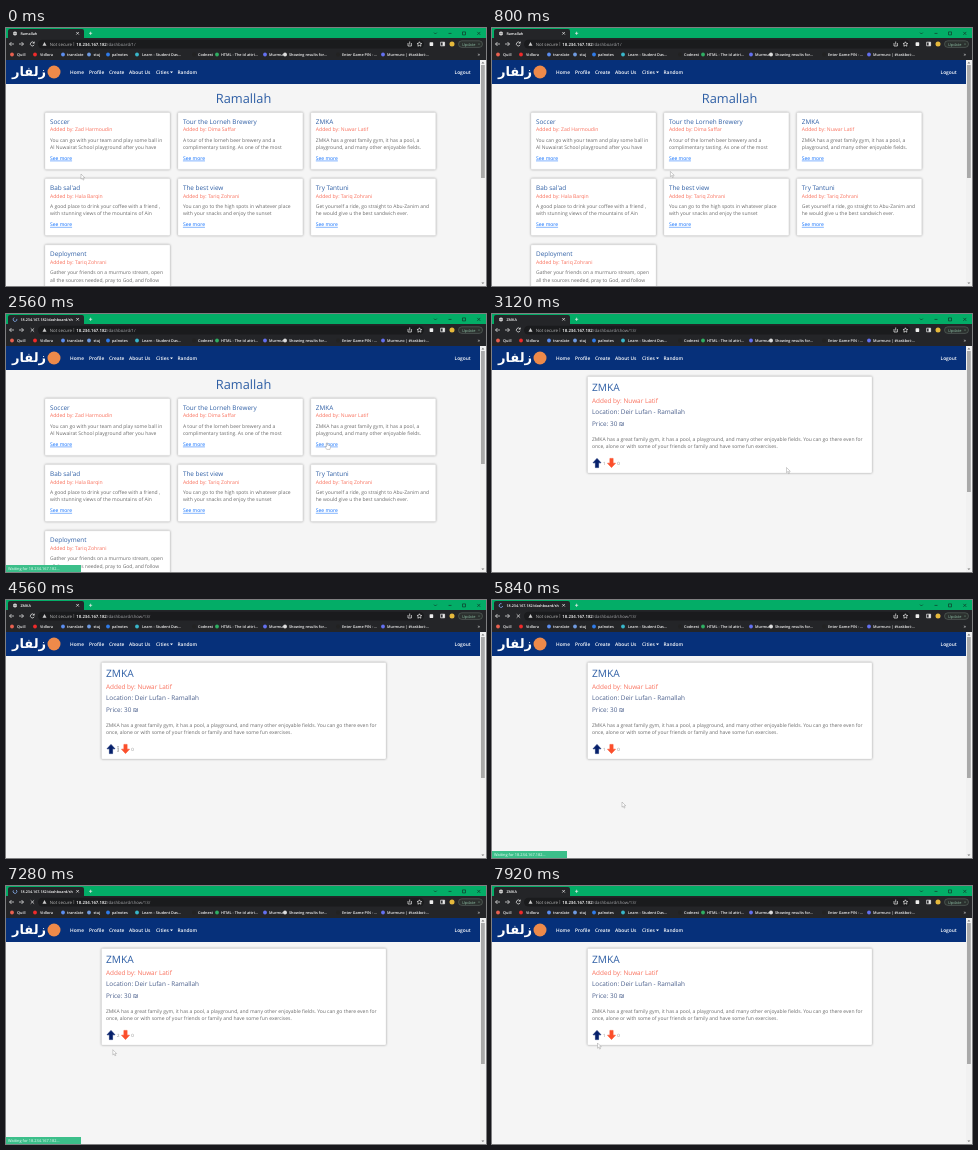
An HTML page for the animation above (8000 ms loop, 480 by 258 pixels).

```html
<!DOCTYPE html>
<html lang="en">
<head>
<meta charset="utf-8">
<style>
html, body { margin: 0; width: 100%; height: 100%; overflow: hidden; background: #f5f5f5; }
svg { display: block; width: 480px; height: 258px; font-family: "Open Sans", sans-serif; text-rendering: geometricPrecision; }
text { white-space: pre; }
.card { fill: #fff; stroke: #d4d4d4; stroke-width: .3; filter: drop-shadow(.9px .9px .9px #0005); }
.line { fill: none; stroke: #eee; stroke-width: .7; }
.pointer { fill: #fff; stroke: #777; stroke-width: .35; }
</style>
</head>
<body>
<svg id="stage" viewBox="0 0 480 258"></svg>
<script>
const HOST = '18.234.167.182';
const BLUE = '#2f5fa5', CORAL = '#f9705c', GREY = '#6a6a6a', SLATE = '#4a5f8c';

const text = (x, y, size, fill, str, attrs = '') =>
  `<text x="${x}" y="${y}" font-size="${size}" fill="${fill}" ${attrs}>${str}</text>`;
const rect = (x, y, w, h, fill, attrs = '') =>
  `<rect x="${x}" y="${y}" width="${w}" height="${h}" fill="${fill}" ${attrs}/>`;
const dot = (x, y, r, fill) => `<circle cx="${x}" cy="${y}" r="${r}" fill="${fill}"/>`;
const line = (d, attrs = '') => `<path class="line" d="${d}" ${attrs}/>`;
const group = (id, body) => `<g id="${id}">${body}</g>`;

const bookmarks = [
  [6, 11, '#e8604f', 'Quill'], [29, 34, '#f02a2a', 'Vidlora'],
  [57, 61, '#5b8def', 'translate'], [83, 87.5, '#6f9ae0', 'stuj'],
  [102, 106, '#2f7be8', 'palnotes'], [131, 136, '#38b6c9', 'Learn - Student Das...'],
  [188, 192, '#222', 'Codnest'], [211, 215, '#2fae62', 'HTML - The id attri...'],
  [259, 263, '#6370f0', 'Murmuro'], [279, 283, '#ddd', 'Showing results for...'],
  [332, 336, '#222', 'Enter Game PIN - ...'], [377, 381, '#6370f0', 'Murmuro | #taskbot-...'],
];

function browser() {
  return rect(0, 0, 480, 11, '#03ad67') +
    rect(2, 1, 76, 12, '#242528', 'rx="2"') +
    rect(0, 10, 480, 22, '#242528') +
    group('globe', dot(9, 5.5, 2, '#eee') + line('M7 5.5h4M9 3.5v4', 'style="stroke:#555;stroke-width:.4"')) +
    group('spinner', '<path d="M9 3.6a1.9 1.9 0 1 1-1.9 1.9" fill="none" stroke="#8ab4f8" stroke-width=".7"/>') +
    text(14.5, 6.8, 3.7, '#fff', '', 'id="title" font-weight="600"') +
    line('M70.3 4l2.6 2.6M72.9 4l-2.6 2.6M83 5.3h3.2M84.6 3.7v3.2') +
    line('M428 4.6l1.4 1.4 1.4-1.4M442.5 5.4h3M456.5 3.9h3v3h-3zM471.3 3.9l3 3M474.3 3.9l-3 3', 'style="stroke:#12382a"') +
    rect(32, 11.8, 386, 8.6, '#1a1b1d', 'rx="4.3"') +
    line('M8 16H3.5M5.5 14l-2 2 2 2M13 16h4.5M15.5 14l2 2-2 2') +
    group('reload', line('M28 14.8a2 2 0 1 0 .2 2M28.3 13.6v1.6h-1.6')) +
    group('stop', line('M24.7 14.3l3.4 3.4M28.1 14.3l-3.4 3.4')) +
    '<path d="M38.5 14l2 3.7h-4z" fill="#ccc"/>' +
    text(43.7, 17.6, 4.4, '#bbb', 'Not secure') + line('M67.7 14v4', 'style="stroke:#666"') +
    text(70.3, 17.6, 4.3, '#fff', `<tspan font-weight="600">${HOST}</tspan><tspan id="path" fill="#a4a6a9"></tspan>`) +
    line('M402 15v3h3.4v-3M403.7 16.5v-3M413.4 13.8l.8 1.5 1.6.2-1.2 1.1.3 1.6-1.5-.8-1.5.8.3-1.6-1.2-1.1 1.6-.2z') +
    rect(423.6, 14.3, 3.6, 3.6, '#eee', 'rx=".6"') +
    line('M434.6 14.2h4v3.6h-4z') + rect(436.6, 14.2, 2, 3.6, '#eee') +
    dot(446, 16, 2.5, '#e6b93c') +
    rect(452.5, 12.8, 24, 6.6, '#2b302e', 'rx="3.3" stroke="#68776f" stroke-width=".5"') +
    text(456, 17.5, 3.9, '#8fbfa6', 'Update') + dot(473, 16, .5, '#8fbfa6') +
    bookmarks.map(([ix, tx, color, label]) =>
      dot(ix, 26.5, 1.9, color) + text(tx, 28, 3.8, '#f4f4f4', label, 'font-weight="600"')).join('') +
    text(471.5, 28, 5, '#eee', '»');
}

function navbar() {
  const links = [[64, 'Home'], [83, 'Profile'], [103, 'Create'], [123, 'About Us'],
    [150, 'Cities'], [171.5, 'Random'], [448.5, 'Logout']];
  return rect(0, 32, 474, 24, '#06307a') +
    text(40, 48, 13, '#fff', 'زلفار', 'text-anchor="end" direction="ltr" font-weight="700" font-family="DejaVu Sans, sans-serif"') +
    dot(48, 44, 6.5, '#ee8a4a') +
    links.map(([x, label]) => text(x, 46.2, 4.85, '#fff', label, 'font-weight="600"')).join('') +
    '<path d="M164 43.6h3l-1.5 1.6z" fill="#fff"/>';
}

const places = [
  ['Soccer', 'Zad Harmoudin', 'You can go with your team and play some ball in', 'Al Nuwairat School playground after you have'],
  ['Tour the Lorneh Brewery', 'Dima Saffar', 'A tour of the lorneh beer brewery and a', 'complimentary tasting. As one of the most'],
  ['ZMKA', 'Nuwar Latif', 'ZMKA has a great family gym, it has a pool, a', 'playground, and many other enjoyable fields.'],
  ["Bab sal'ad", 'Hala Barqin', 'A good place to drink your coffee with a friend ,', 'with stunning views of the mountains of Ain'],
  ['The best view', 'Tariq Zohrani', 'You can go to the high spots in whatever place', 'with your snacks and enjoy the sunset'],
  ['Try Tantuni', 'Tariq Zohrani', 'Get yourself a ride, go straight to Abu-Zanim and', 'he would give u the best sandwich ever.'],
  ['Deployment', 'Tariq Zohrani', 'Gather your friends on a murmuro stream, open', 'all the sources needed, pray to God, and follow'],
];

function listPage() {
  const cards = places.map(([title, author, first, second], i) =>
    `<g transform="translate(${39 + i % 3 * 132.9} ${84.4 + Math.floor(i / 3) * 66.2})">` +
    '<rect class="card" width="125" height="57" rx="1"/>' +
    text(5, 11.2, 6.4, BLUE, title) +
    text(5, 19, 5.1, CORAL, `Added by: ${author}`) +
    text(5, 29.4, 5, GREY, first) + text(5, 36.9, 5, GREY, second) +
    text(5, 47.3, 5, '#0d6efd', 'See more', 'text-decoration="underline"') + '</g>');
  return text(237.5, 74.6, 12.8, BLUE, 'Ramallah', 'text-anchor="middle"') + cards.join('');
}

function detailPage() {
  const up = 'M0-4.6L4-.2H1.6V4.6H-1.6V-.2H-4Z';
  const arrow = (x, flip, color) =>
    `<path d="${up}" transform="translate(${x} 149) scale(1 ${flip})" fill="${color}" stroke="${color}" stroke-width=".6" stroke-linejoin="round"/>`;
  return '<rect class="card" x="95.5" y="62.5" width="284.5" height="96.5" rx="1"/>' +
    text(100, 77.2, 10.2, BLUE, 'ZMKA') +
    text(100, 89, 6.4, CORAL, 'Added by: Nuwar Latif') +
    text(100, 100.4, 6.4, SLATE, 'Location: Deir Lufan - Ramallah') +
    text(100, 111.8, 6.4, SLATE, 'Price: 30 ₪') +
    text(100, 126.6, 5, GREY, 'ZMKA has a great family gym, it has a pool, a playground, and many other enjoyable fields. You can go there even for') +
    text(100, 134, 5, GREY, 'once, alone or with some of your friends or family and have some fun exercises.') +
    arrow(105, 1, '#06206b') + arrow(119.5, -1, '#fb4f2c') +
    text(111, 150.6, 4.4, '#888', '1', 'id="votes"') + text(125.2, 150.6, 4.4, '#888', '0');
}

const overlay =
  rect(474, 32, 6, 226, '#f1f1f1') + rect(475, 37, 3.8, 113, '#a9a9a9', 'id="thumb"') +
  '<path d="M475.4 35.4h3l-1.5-1.7zM475.4 254.4h3l-1.5 1.7z" fill="#777"/>' +
  group('status', rect(0, 251, 75, 7, '#3cbf8a') + text(2, 256.1, 3.9, '#f4fffa', '', 'id="statusText"')) +
  group('cursor',
    '<path id="arrow" class="pointer" d="M0 0v5.2l1.2-1.1.9 2 .9-.4-.9-1.9h1.7z"/>' +
    '<path id="hand" class="pointer" d="M-.6 0q.7-.7 1.2 0v2.1l2.6.6q.6.3.4 1.2L3 6.4H-.3L-2 3.9q0-.9 1.4 0z"/>' +
    '<path id="beam" d="M-1-2.4H1M0-2.4V2.4M-1 2.4H1" fill="none" stroke="#777" stroke-width=".4"/>');

const $ = id => document.getElementById(id);
$('stage').innerHTML = rect(0, 0, 480, 258, '#f5f5f5') +
  group('list', listPage()) + group('detail', detailPage()) + navbar() + browser() + overlay;

// Pointer path: time, x, y
const route = [
  [0, 75, 146], [160, 75, 146], [1600, 323, 140], [1760, 323, 140], [2080, 321, 129], [2640, 321, 129],
  [3120, 294.5, 153.5], [3440, 262, 163], [4400, 112, 149], [4800, 112, 149], [4960, 104.5, 150],
  [5440, 104.5, 150], [5840, 130, 202], [6000, 130, 202], [6400, 104, 150],
  [7120, 104, 150], [7520, 112, 189], [7680, 112, 189], [7920, 105.5, 157], [8000, 105.5, 157],
];
const loads = [[2320, 2640], [5360, 6000], [7040, 7520]];
const hovers = [[2080, 2640], [5040, 5520], [6400, 7120]];

const within = (t, spans) => spans.some(([from, to]) => t >= from && t < to);
const show = (id, on) => $(id).setAttribute('visibility', on ? 'visible' : 'hidden');

function pointer(t) {
  const i = route.findIndex(p => p[0] > t);
  const [t0, x0, y0] = route[i - 1], [t1, x1, y1] = route[i];
  const u = (t - t0) / (t1 - t0), e = u * u * (3 - 2 * u);
  return [x0 + (x1 - x0) * e, y0 + (y1 - y0) * e];
}

function draw(t) {
  const onList = t < 2640, loading = within(t, loads), hover = within(t, hovers);
  const beam = t >= 4320 && t < 4960;
  show('list', onList);
  show('detail', !onList);
  show('spinner', loading);
  show('globe', !loading);
  show('stop', loading);
  show('reload', !loading);
  show('status', hover || loading);
  show('hand', hover);
  show('beam', beam);
  show('arrow', !hover && !beam);
  $('title').textContent = loading ? `${HOST}/dashboard/sh` : onList ? 'Ramallah' : 'ZMKA';
  $('path').textContent = onList ? '/dashboard/1/' : '/dashboard/show/13/';
  $('statusText').textContent = loading ? `Waiting for ${HOST}...` :
    `${HOST}/dashboard/${onList ? 'show' : 'like'}/13/`;
  $('votes').textContent = t >= 6000 && t < 7520 ? 2 : 1;
  $('thumb').setAttribute('height', onList ? 113 : 141);
  $('spinner').setAttribute('transform', `rotate(${t * .45} 9 5.5)`);
  $('cursor').setAttribute('transform', `translate(${pointer(t)})`);
}

const start = performance.now();
function tick() {
  draw(Math.floor((performance.now() - start) % 8000 / 80) * 80);
  requestAnimationFrame(tick);
}
tick();
</script>
</body>
</html>
```
